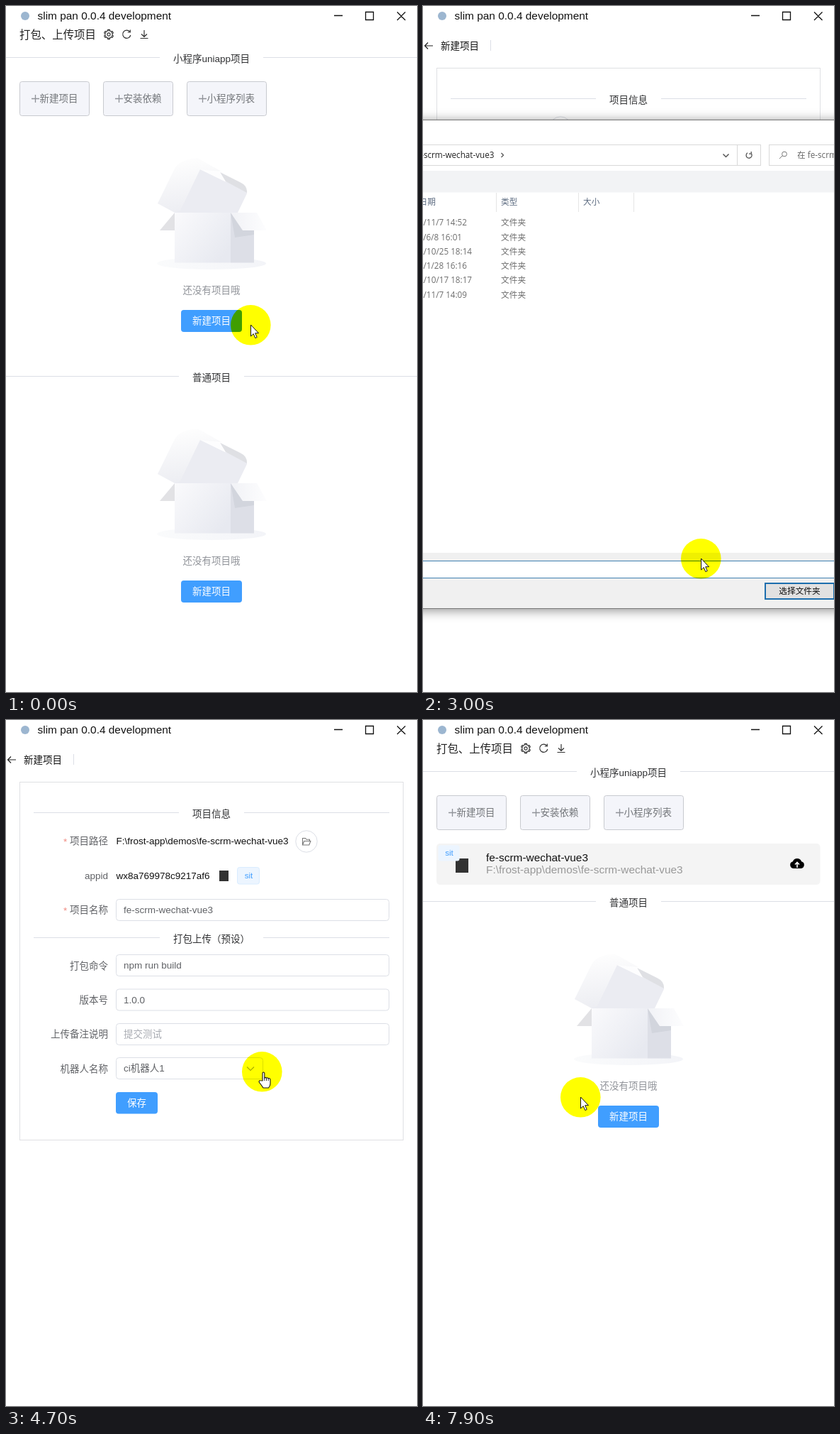
Write an HTML page that moves like this. It is 580 by 966 pixels and loops after 8000 ms.

```html
<!DOCTYPE html>
<html lang="zh-CN">
<head>
<meta charset="utf-8">
<style>
  html, body { margin: 0; width: 100%; height: 100%; overflow: hidden; background: #fff; }
  svg { display: block; width: 580px; height: 966px; }
  text { font-family: "Liberation Sans", "Noto Sans CJK SC", "Noto Sans CJK", sans-serif; white-space: pre; }
  #dialog text { font-family: "Open Sans", "Noto Sans CJK SC", "Noto Sans CJK", sans-serif; }
  #halo { mix-blend-mode: multiply; }
  #dialog { filter: drop-shadow(0 2px 8px rgba(0,0,0,.45)); }
</style>
</head>
<body>
<svg id="stage" viewBox="0 0 580 966"></svg>
<script>
const BLUE = '#409eff', LIGHT_BLUE = '#66b1ff', INK = '#303133', GREY = '#606266', PALE = '#909399', EDGE = '#dcdfe6';
const PROJECT = 'fe-scrm-wechat-vue3';
const FOLDER = String.raw`F:\frost-app\demos\fe-scrm-wechat-vue3`;

// Drawing helpers; text is placed by its vertical centre
const text = (x, cy, s, fill = INK, size = 13.5, anchor = 'start') =>
  `<text x="${x}" y="${cy + size * .36}" fill="${fill}" font-size="${size}" text-anchor="${anchor}">${s}</text>`;
const mid = (x, cy, s, fill, size) => text(x, cy, s, fill, size, 'middle');
const end = (x, cy, s, fill, size) => text(x, cy, s, fill, size, 'end');
const rect = (x, y, w, h, fill, stroke = 'none', rx = 0, more = '') =>
  `<rect x="${x}" y="${y}" width="${w}" height="${h}" fill="${fill}" stroke="${stroke}" rx="${rx}" ${more}/>`;
const line = (d, stroke = INK, w = 1, more = '') =>
  `<path d="${d}" fill="none" stroke="${stroke}" stroke-width="${w}" ${more}/>`;
const shape = (d, fill) => `<path d="${d}" fill="${fill}"/>`;
const group = (id, body) => `<g id="${id}">${body}</g>`;
const divider = (y, x0, x1, g0, g1, label) =>
  line(`M${x0} ${y}H${g0}M${g1} ${y}H${x1}`, EDGE) + mid(290, y + 1.5, label);
const gradient = (id, dir, a, b) =>
  `<linearGradient id="${id}" ${dir}><stop stop-color="${a}"/><stop offset="1" stop-color="${b}"/></linearGradient>`;

const defs = `<defs>
  ${gradient('lid', 'x1=".35" y1="0" x2=".5" y2="1"', '#fefefe', '#ecedf2')}
  ${gradient('front', 'x1="0" y1="0" x2="1" y2=".7"', '#fafafc', '#e7e9f0')}
  ${gradient('flap', 'x1="0" x2="1"', '#f1f2f6', '#fdfdfe')}
  ${gradient('ground', 'x1="0" x2="1"', '#fafbfc', '#f3f4f8')}
  <g id="carton">
    <ellipse cx="290" cy="362.5" rx="77" ry="8.5" fill="url(#ground)"/>
    ${shape('M214 278L238 229Q243 219 262 215L270 214L304 233L275 231L250 291H238Z', 'url(#lid)')}
    ${shape('M274 230L309 247L333 254Q341 257 340 264L327 291H238L246 288Z', '#ebecf2')}
    ${shape('M302 234L330 248Q341 253 340 263L310 247Z', '#dfe0e4')}
    ${shape('M274 230L302 234L309 247Z', '#fdfdfe')}
    ${shape('M238 291V316H217Z', '#e2e2e5')}
    ${rect(238, 291, 79, 70.5, 'url(#front)')}
    ${rect(317, 291, 33, 70.5, '#dddfe7')}
    ${shape('M317 291L323 326L350 322V315Z', '#d2d5dd')}
    ${shape('M317 291H354L368 316H334Z', 'url(#flap)')}
  </g></defs>`;

const emptyBox = (id, dy) => `<g id="${id}" transform="translate(0 ${dy})"><use href="#carton"/>
  ${mid(290, 400, '还没有项目哦', PALE)}
  ${rect(247, 428, 86, 31, BLUE, 'none', 4, 'class="create"')}${mid(290, 443.5, '新建项目', '#fff')}</g>`;

const plusButton = (x, w, label) => rect(x + .5, 106.5, w, 48, '#f4f5fa', '#c8cacf', 3) +
  line(`M${x + 17} 130.5h11m-5.5 -5.5v11`, PALE, 1.3) + text(x + 28.5, 130.5, label, '#73767a');

const titleBar = `<circle cx="27" cy="14" r="6" fill="#9cb6d0"/>` +
  text(44.5, 13.4, 'slim pan 0.0.4 development', '#111', 15.43) +
  line('M463 13.5H475M507.5 8.5h11v11h-11ZM552 8.5L563.5 20M563.5 8.5L552 20', '#111', 1.3);

const gear = Array.from({ length: 6 }, (_, i) =>
  `<path d="M-2 -5L-1.3 -6.6H1.3L2 -5" transform="rotate(${i * 60})"/>`).join('');

const home = text(19, 40, '打包、上传项目', '#222', 15.43) +
  `<g transform="translate(145 40)" fill="none" stroke="#333" stroke-width="1.1"><circle r="5.2"/><circle r="2.1"/>${gear}</g>` +
  line('M174.5 36A5.6 5.6 0 1 0 175.8 41M175.3 33.5V37H171.8', '#333', 1.2) +
  line('M195 34V43M191 39.5L195 43.3L199 39.5M189.5 45.5H200.5', '#333', 1.2) +
  divider(72.5, 0, 580, 217, 363, '小程序uniapp项目') +
  plusButton(19, 98, '新建项目') + plusButton(137, 98, '安装依赖') + plusButton(255, 112, '小程序列表') +
  emptyBox('first', 0) +
  group('item', rect(19, 174, 541.5, 58, '#f4f4f4', 'none', 5) + rect(46, 195, 18, 20, '#333') +
    rect(21.5, 176.5, 30, 22, '#ecf5ff', 'none', 3) + mid(37, 187, 'sit', BLUE, 11.6) +
    text(89, 193.5, PROJECT, '#111', 15.43) + text(89, 210.6, FOLDER, '#999', 15.43) +
    shape('M522.5 209a5 5 0 0 1 -.6 -9.8a6.6 6.6 0 0 1 12.2 0a5 5 0 0 1 -.6 9.8Z', '#000') +
    line('M528 208V201M525 203.5L528 200.5L531 203.5', '#fff', 1.6)) +
  group('plain', divider(521.5, 0, 580, 244, 336, '普通项目') + emptyBox('second', 381));

const label = (cy, s, need) => end(144, cy, s, GREY) + (need ? text(81, cy + 1, '*', '#f08a80') : '');
const field = (y, w, s, fill = GREY, id = '') =>
  rect(155.5, y, w, 30, '#fff', EDGE, 4, `id="${id}"`) + text(166, y + 15, s, fill);
const folderButton = (x, color) => `<circle cx="${x}" cy="171" r="15.2" fill="#fff" stroke="${EDGE}"/>` +
  line(`M${x - 5.5} 176V166.5h4l1.5 1.8h4.5v2M${x - 5.5} 176l2.3 -5.5h9l-2 5.5Z`, color, 1.1);

const form = line('M14 56H3M7 51.5L2.5 56L7 60.5', '#222', 1.2) + text(25, 56, '新建项目', '#111') +
  line('M95.5 48V63', EDGE) + rect(19.5, 87.5, 541, 504, '#fff', '#dfe0e3') +
  divider(130.5, 39, 541, 244, 336, '项目信息') + divider(306.5, 39, 541, 217, 363, '打包上传（预设）') +
  label(170.5, '项目路径', 1) + label(219.5, 'appid') + label(267.5, '项目名称', 1) + label(346, '打包命令') +
  label(394.5, '版本号') + label(442.5, '上传备注说明') + label(491, '机器人名称') +
  field(252.5, 385, '') + field(330.5, 385, 'npm run build') + field(379, 385, '1.0.0') +
  field(427.5, 385, '提交测试', '#a8abb2', 'note') + field(475.5, 207, 'ci机器人1') +
  line('M340 488.5L345 493.5L350 488.5', '#a8abb2', 1.1) +
  rect(155, 524, 59, 30.5, BLUE, 'none', 4, 'id="save"') + mid(184.5, 539, '保存', '#fff') +
  group('blank', text(155.5, 170.5, '无', '#111') + text(155.5, 219.5, '无', '#111') + folderButton(194, '#a8abb2')) +
  group('filled', text(155.5, 170.5, FOLDER, '#111') + folderButton(424, '#777') +
    text(155.5, 219.5, 'wx8a769978c9217af6', '#111') + rect(301, 212, 13, 15, '#333') +
    rect(326.5, 207.5, 31, 23.5, '#ecf5ff', '#d9ecff', 3) + mid(342.5, 219, 'sit', BLUE, 11.6) +
    text(166, 267.5, PROJECT, GREY));

const rows = ['11/7 14:52', '6/8 16:01', '10/25 18:14', '1/28 16:16', '10/17 18:17', '11/7 14:09'];
const rowEnds = [62, 55, 69, 62, 69, 62];
const dialog = rect(-100, 160.5, 780, 688, '#fff', '#777') +
  rect(-90, 195.5, 566.5, 29, '#fff', '#d9d9d9') + line('M443.5 196V224', '#d9d9d9') +
  rect(488.5, 195.5, 180, 29, '#fff', '#d9d9d9') +
  end(100.5, 210, PROJECT, '#222', 11.7) + line('M110.5 207L113.5 210L110.5 213', '#555', 1.3) +
  line('M423.5 208.5L427.5 212.5L431.5 208.5', '#555', 1.5) +
  line('M463 207.5A4 4 0 1 1 458 206.8M463.2 205V208.2H460', '#555', 1.3) +
  line('M503 215L507 211M506.6 208.5a3.4 3.4 0 1 1 6.8 0a3.4 3.4 0 1 1 -6.8 0', '#777', 1) +
  text(528, 210, '在 ' + PROJECT + ' 中搜索', '#666', 11.7) +
  rect(-99, 232, 778, 30.5, '#f2f3f5') +
  end(18, 275.5, '修改日期', '#5c6b80', 11.7) + text(110, 275.5, '类型', '#5c6b80', 11.7) +
  text(226, 275.5, '大小', '#5c6b80', 11.7) +
  line('M103.5 263V290M219.5 263V290M297.5 263V290', '#e5e5e5') +
  rows.map((r, i) => end(rowEnds[i], 305 + 20.3 * i, '2022/' + r, '#6d6d6d', 11.7) +
    text(110, 305 + 20.3 * i, '文件夹', '#6d6d6d', 11.7)).join('') +
  rect(-99, 770, 778, 78, '#f0f0f0') + rect(-90, 781.5, 760, 24, '#fff', '#3f7fb0') +
  rect(483, 813, 97, 22, '#e1e1e1', '#1d6fae', 0, 'stroke-width="2"') +
  mid(531.5, 824, '选择文件夹', '#111', 11.7);

const pointer = group('arrow', `<path d="M.5 0V16L4.2 12.6L6.8 18.6L9.2 17.5L6.7 11.7H11.5Z" fill="#fff" stroke="#111"/>`) +
  group('hand', `<path d="M1 13V2.5Q1 1 2.3 1T3.8 2.5V9Q5 7.8 6.4 9.2Q7.8 8.2 9 9.6Q12 9 12 12V17Q12 20 9.5 23H2Q-1 18.5 -3.8 15Q-4.2 12.5 -2 12.8Z"
    fill="#fff" stroke="#111" stroke-width="1.1"/>` + line('M3.8 9V13M6.5 9.5V13M9.2 10V13', '#111', .9)) +
  group('beam', line('M-1 -6Q1.5 -6 2 -5Q2.5 -6 5 -6M2 -5V8M-1 9Q1.5 9 2 8Q2.5 9 5 9', '#222', 1.2));

stage.innerHTML = defs + rect(0, 0, 580, 966, '#fff') + titleBar + group('home', home) + group('form', form) +
  group('dialog', dialog) + `<circle id="halo" cx=".3" cy=".3" r="28.3" fill="#ff0"/>` + group('pointer', pointer);

// Pointer path: time, x, y
const path = [[0, 345, 449], [600, 310, 447], [700, 310, 447], [1000, 194, 171], [1200, 309, 447], [1600, 157, 357],
  [1700, 304, 428], [1800, 275, 426], [2400, 275, 426], [3000, 392, 778], [3300, 482, 799], [3600, 504, 816],
  [4000, 504, 816], [4200, 503, 807], [4700, 361, 495], [4900, 340, 200], [5100, 290, 468], [5800, 257, 445],
  [6000, 250, 456], [6700, 200, 534], [7100, 200, 534], [7900, 222, 531], [8000, 222, 531]];

const $ = id => document.getElementById(id);
const show = (id, on) => $(id).style.display = on ? '' : 'none';
const ramp = (t, a, b) => Math.min(1, Math.max(0, (t - a) / (b - a)));

function pointerAt(t) {
  const i = path.findIndex(k => k[0] > t), [t0, x0, y0] = path[i - 1], [t1, x1, y1] = path[i];
  const k = (t - t0) / (t1 - t0);
  return [x0 + (x1 - x0) * k, y0 + (y1 - y0) * k];
}

function draw(t) {
  const [x, y] = pointerAt(t);
  const over = (l, top, r, b) => x >= l && x <= r && y >= top && y <= b;
  const onForm = t >= 800 && t < 7200, saved = t >= 7200, filled = t >= 4100;
  const open = ramp(t, 1170, 1400) * (1 - ramp(t, 3650, 3900));

  show('home', !onForm); show('form', onForm);
  show('first', !saved); show('item', saved);
  $('plain').setAttribute('transform', `translate(0 ${saved ? -266 : 0})`);
  show('blank', !filled); show('filled', filled);

  show('dialog', open > 0);
  $('dialog').setAttribute('opacity', open);
  $('dialog').setAttribute('transform', `translate(290 504) scale(${.952 + .048 * open}) translate(-290 -504)`);

  const onCreate = !onForm && !saved && over(247, 428, 333, 459);
  const onSave = onForm && over(155, 523, 214, 555);
  const onNote = onForm && over(155, 427, 541, 458);
  document.querySelector('.create').setAttribute('fill', onCreate ? LIGHT_BLUE : BLUE);
  $('save').setAttribute('fill', onSave ? LIGHT_BLUE : t < 1300 ? '#53a8ff' : BLUE);
  $('note').setAttribute('stroke', onNote ? '#b4b8c0' : EDGE);

  const folderX = filled ? 424 : 194;
  const hand = !open && (onCreate || onSave || onForm &&
    (over(155, 475, 363, 506) || Math.hypot(x - folderX, y - 171) < 16));
  const beam = !open && onForm && !hand &&
    [252, 330, 379, 427].some(top => over(155, top, 541, top + 31));
  show('hand', hand); show('beam', beam); show('arrow', !hand && !beam);
  $('halo').setAttribute('transform', `translate(${x} ${y})`);
  $('pointer').setAttribute('transform', `translate(${x} ${y})`);
}

function tick(now) {
  draw(Math.floor(now % 8000 / 100) * 100);
  requestAnimationFrame(tick);
}
draw(0);
requestAnimationFrame(tick);
</script>
</body>
</html>
```
